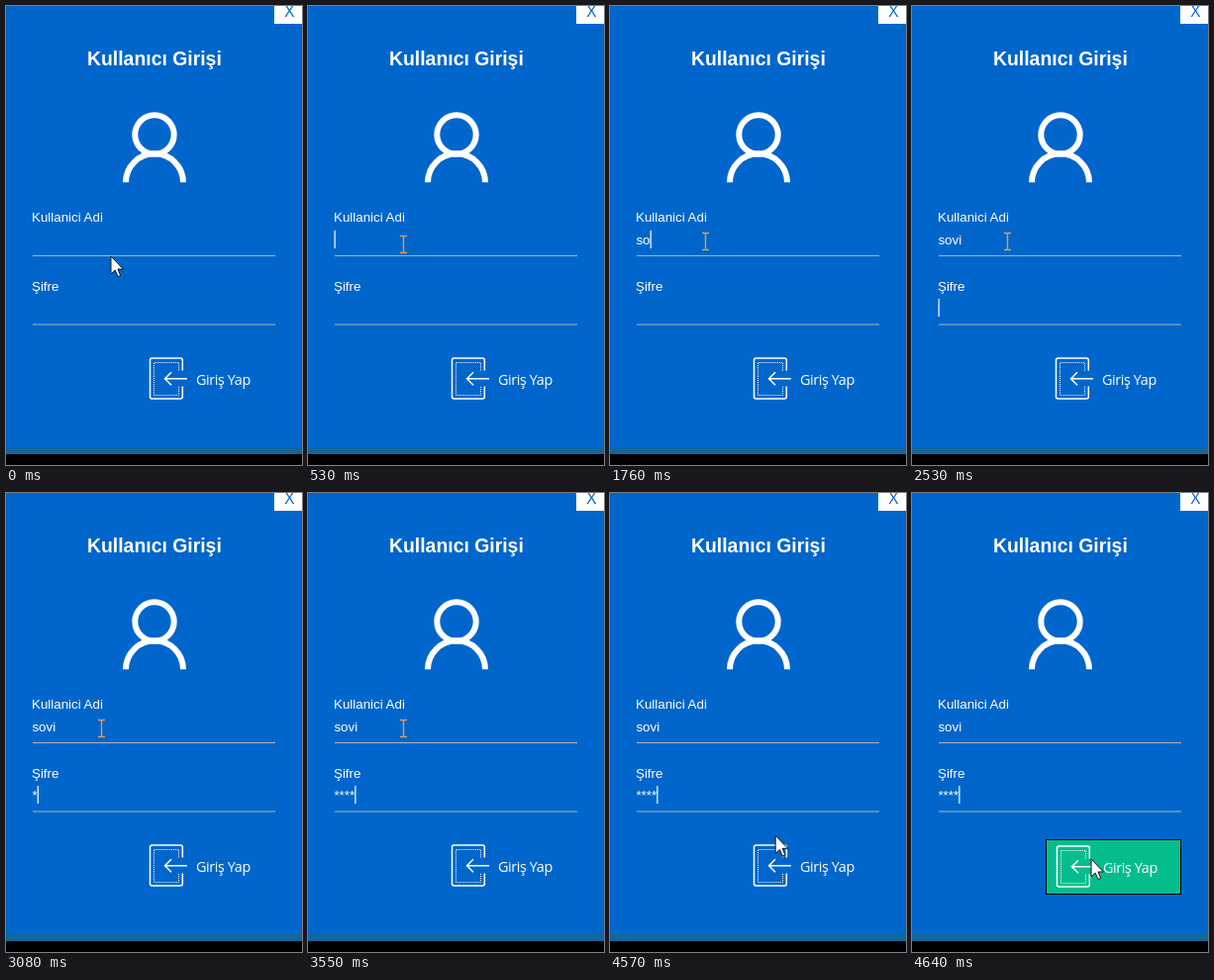
An HTML page that plays this animation: 299x464 px, repeating every 4960 ms.

```html
<!DOCTYPE html>
<html lang="tr">
<head>
<meta charset="utf-8">
<title>Kullanıcı Girişi</title>
<style>
  html, body { margin: 0; width: 100%; height: 100%; overflow: hidden; background: #0066cc; }
  svg { display: block; width: 299px; height: 464px; }
  text { fill: #fff; font: 13.33px "Liberation Sans", Arial, sans-serif; }
  .title { font-size: 19.4px; font-weight: bold; }
  .close { fill: #0066cc; font: 17px "Open Sans", "Noto Sans", sans-serif; text-anchor: middle; }
  .action { font: 14.4px "Open Sans", "Noto Sans", sans-serif; letter-spacing: -.4px; }
  .line { fill: none; stroke: #fff; }
</style>
</head>
<body>
<svg viewBox="0 0 299 464">
  <rect width="299" height="464" fill="#0066cc"/>
  <rect y="446" width="299" height="7" fill="#11679b"/>
  <rect y="453" width="299" height="11"/>

  <rect x="271" width="28" height="18" fill="#fff"/>
  <text class="close" x="286.3" y="11">X</text>
  <text class="title" x="82" y="60">Kullanıcı Girişi</text>

  <g class="line" stroke-width="6">
    <circle cx="150" cy="130" r="19.7"/>
    <path d="M121 178.3A29 29 0 0 1 179 178.3"/>
  </g>

  <text x="26" y="217.6">Kullanici Adi</text>
  <text x="26" y="288">Şifre</text>
  <path d="M27 252.5H272M27 322H272" stroke="#b4b4b4"/>
  <text id="user" x="26.4" y="241"></text>
  <text id="pass" x="26.4" y="310"></text>
  <rect id="caret" width="1.2" height="18" fill="#fff"/>

  <rect id="hover" x="135.5" y="350.5" width="136" height="55" fill="#05bd8c" stroke="#000"/>
  <g id="button">
    <g class="line" stroke-width="1.5">
      <path d="M178.3 368.5V358Q178.3 356 176.3 356H147.5Q145.5 356 145.5 358V395Q145.5 397 147.5 397H176.3Q178.3 397 178.3 395V384.5"/>
      <path d="M183 376.7H160.5M167 370.2L160.5 376.7L167 383.2"/>
      <path d="M174.5 368.5V360.5H149.5V393.5H174.5V384.5" stroke-width="1" stroke-dasharray="1 1.1"/>
    </g>
    <text class="action" x="192" y="382.7">Giriş Yap</text>
  </g>

  <path id="beam" d="M-3.5-8.5H-1Q0-8.5 0-7.5Q0-8.5 1-8.5H3.5M0-7.5V7.5M-3.5 8.5H-1Q0 8.5 0 7.5Q0 8.5 1 8.5H3.5"
        fill="none" stroke="#e39a55" stroke-width="1.4"/>
  <path id="arrow" d="M0 0V18L4.2 14.1L7 20.6L9.7 19.5L7 13H12.4Z" fill="#fff" stroke="#0a1428"/>
</svg>
<script>
  const LOOP = 4960;
  const BLINK = 470;
  const USER = "sovi";

  // Moments in ms.
  const ENTER_FIELD = 70, FOCUS_USER = 530, NUDGE = 830;
  const FOCUS_PASS = 2530, LEAVE_FIELD = 4340, HOVER = 4640;
  const userKeys = [1530, 1760, 1840, 2150];
  const passKeys = Array.from(USER, (_, i) => 3075 + 155 * i);
  const inputs = [FOCUS_USER, ...userKeys, FOCUS_PASS, ...passKeys];

  const $ = id => document.getElementById(id);
  const countUntil = (times, t) => times.filter(time => time <= t).length;

  function show(id, visible) {
    $(id).style.visibility = visible ? "visible" : "hidden";
  }

  function move(id, x, y) {
    $(id).setAttribute("transform", `translate(${x} ${y})`);
  }

  function drawFields(t) {
    $("user").textContent = USER.slice(0, countUntil(userKeys, t));
    $("pass").textContent = "*".repeat(countUntil(passKeys, t));

    // Every input restarts the blink with the caret shown.
    const sinceInput = t - inputs.findLast(time => time <= t);
    const inPass = t >= FOCUS_PASS;
    const width = $(inPass ? "pass" : "user").getComputedTextLength();
    move("caret", 26.5 + width, inPass ? 296 : 227);
    show("caret", Math.floor(sinceInput / BLINK) % 2 === 0);
  }

  function drawPointer(t) {
    const inField = t >= ENTER_FIELD && t < LEAVE_FIELD;
    show("beam", inField);
    show("arrow", !inField);
    move("beam", 96.5, t < NUDGE ? 241 : 238);

    if (t < ENTER_FIELD) return move("arrow", 106, 253);
    const steps = 4;
    const progress = Math.max(0, (t - LEAVE_FIELD) / (HOVER - LEAVE_FIELD));
    const stepped = Math.min(1, Math.floor(progress * steps) / steps);
    const eased = 1 - (1 - stepped) ** 1.2;
    move("arrow", 108 + 73 * eased, 245 + 125 * eased);
  }

  function draw(t) {
    const shift = t >= HOVER ? 1 : 0;
    show("hover", t >= HOVER);
    move("button", shift, shift);
    drawFields(t);
    drawPointer(t);
  }

  const start = performance.now();
  function tick(now) {
    draw(Math.max(0, now - start) % LOOP);
    requestAnimationFrame(tick);
  }
  draw(0);
  requestAnimationFrame(tick);
</script>
</body>
</html>
```
